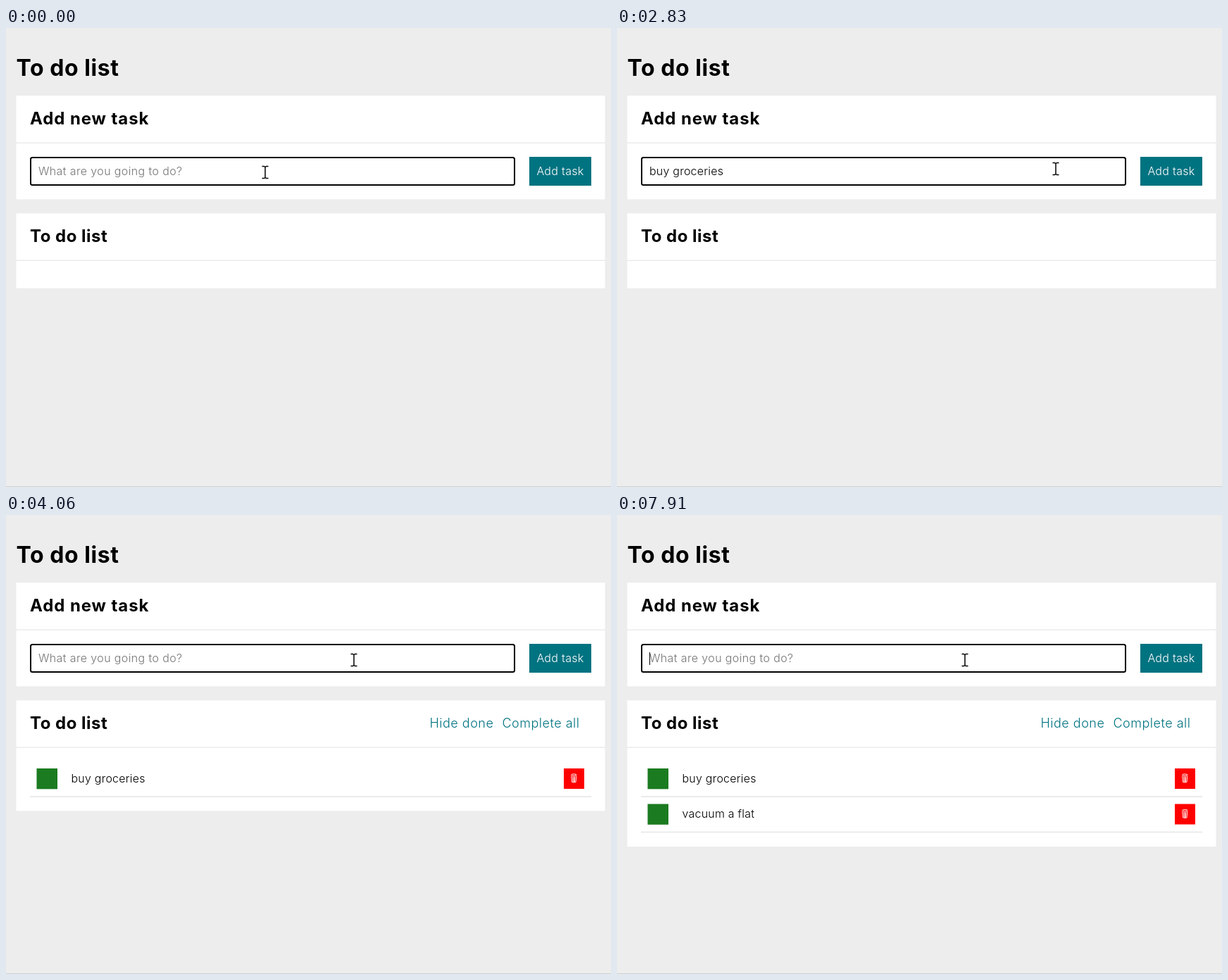
Animation of 859 by 652 pixels, one loop 8000 ms. Source, as an HTML page:

```html
<!DOCTYPE html>
<html lang="en">
<head>
<meta charset="utf-8">
<title>To do list</title>
<style>
  html, body { margin: 0; width: 100%; height: 100%; overflow: hidden; background: #ededed; }
  svg { display: block; }
  text { font: 350 16px Inter, sans-serif; font-optical-sizing: none; white-space: pre; }
  .h1 { font-size: 32px; font-weight: 700; letter-spacing: .55px; }
  .h2 { font-size: 24px; font-weight: 700; letter-spacing: .5px; }
  .wide { letter-spacing: .9px; }
  .link { font-size: 18px; letter-spacing: .5px; fill: #007381; }
  .hint { letter-spacing: .37px; fill: #757575; }
  .task { letter-spacing: .22px; }
  .card { fill: #fff; }
</style>
</head>
<body>
<svg width="859" height="652" viewBox="0 0 859 652">
  <defs>
    <g id="row">
      <rect x="43.5" y="360" width="29.5" height="29.3" fill="#1b7b20"/>
      <rect x="792" y="360" width="29" height="29" fill="#f00"/>
      <g fill="none" stroke="#fff">
        <ellipse cx="806.3" cy="369.2" rx="3.8" ry="1.2"/>
        <path d="M802.7 370.5l.8 8.8q2.8 1.4 5.6 0l.8-8.8M804.8 371.5l.3 7.8M806.3 371.5v8M807.8 371.5l-.3 7.8" stroke-width=".9"/>
      </g>
      <rect x="34" y="399" width="797" height="2" fill="#ebebeb"/>
    </g>
    <path id="bar" d="M-4.5 -8.5H-1.5L0 -7.5L1.5 -8.5H4.5M0 -7.5V7.5M-4.5 8.5H-1.5L0 7.5L1.5 8.5H4.5"/>
  </defs>

  <rect width="859" height="652" fill="#ededed"/>
  <rect y="651" width="859" height="1" fill="#cfcfcf"/>
  <text class="h1" x="14.5" y="68.3">To do list</text>

  <rect class="card" x="14.5" y="96" width="836" height="66.3"/>
  <rect class="card" x="14.5" y="164" width="836" height="79.3"/>
  <text class="h2 wide" x="34" y="136.5">Add new task</text>

  <rect id="field" fill="#fff"/>
  <text id="hint" class="hint" x="46" y="209">What are you going to do?</text>
  <text id="typed" class="task" x="46" y="209"></text>
  <rect id="caret" y="195" width="1" height="18"/>

  <g id="button">
    <rect x="743" y="183" width="88" height="41"/>
    <text x="787" y="209" text-anchor="middle" letter-spacing=".3" fill="#fff" stroke="none">Add task</text>
  </g>

  <rect class="card" x="14.5" y="263.3" width="836" height="66"/>
  <rect id="list" class="card" x="14.5" y="331" width="836"/>
  <text class="h2" x="34" y="304">To do list</text>

  <g id="first">
    <text class="link" x="601.5" y="302">Hide done</text>
    <text class="link" x="704.5" y="302">Complete all</text>
    <use href="#row"/>
    <text class="task" x="92.5" y="379.5">buy groceries</text>
  </g>
  <g id="second">
    <use href="#row" y="50.5"/>
    <text class="task" x="92.5" y="430">vacuum a flat</text>
  </g>

  <g id="pointer">
    <g id="beam" fill="none">
      <use href="#bar" stroke="#fff" stroke-width="3"/>
      <use href="#bar" stroke="#000" stroke-width="1.5"/>
    </g>
    <path id="hand" d="M-1.6 13.5V1.5Q-1.6 0 0 0T1.6 1.5V7Q3.8 5.6 4.4 7.6Q6.4 6.6 7 8.6Q9 8 9 10.2V15Q9 17.6 7.4 19.2V21.5H-1.4V19.5Q-4.6 16.4 -6.6 12.6Q-7 10.4 -4.8 10.8Q-3.2 11.4 -1.6 13.5ZM1.6 7V11M4.4 7.8V11.4M7 8.8V11.8" fill="#fff" stroke="#333" stroke-width=".8"/>
    <path id="arrow" d="M0 0V16.5L3.8 13L6.5 18.8L9 17.7L6.4 12H11.5Z" fill="#fff" stroke="#000" stroke-width="1"/>
  </g>
</svg>
<script>
const LOOP = 8000, ADD_1 = 3500, ADD_2 = 7910, BLUR = 3380;

const typing = [
  { text: 'buy groceries', end: ADD_1,
    at: [70, 150, 290, 690, 1040, 1180, 1290, 1400, 1520, 1630, 1830, 1960, 2160] },
  { text: 'vacuum a flat', end: ADD_2,
    at: [5390, 5520, 5650, 5850, 5990, 6320, 6450, 6850, 6965, 7080, 7195, 7310, 7510] },
];
const caretOn = [[70, 2660], [ADD_1, 4030], [4530, 5060], [5390, LOOP]];

// time, x, y of the pointer's hot spot
const path = [
  [2560, 368, 205], [2830, 623, 200], [2960, 738, 262], [3040, 762, 285],
  [3200, 775, 235], [3320, 778, 216], [3540, 778, 216], [3640, 735, 214],
  [3800, 590, 210], [4060, 494, 206],
];

const $ = id => document.getElementById(id);
const show = (id, on) => $(id).style.display = on ? '' : 'none';
const set = (id, attrs) => {
  for (const key in attrs) $(id).setAttribute(key, attrs[key]);
};
const inside = (x, y, left, top, right, bottom) =>
  x >= left && x <= right && y >= top && y <= bottom;

function pointerAt(t) {
  const next = path.findIndex(p => p[0] > t);
  if (next === 0) return path[0].slice(1);
  if (next < 0) return path[path.length - 1].slice(1);
  const [t0, x0, y0] = path[next - 1], [t1, x1, y1] = path[next];
  const k = (t - t0) / (t1 - t0);
  return [x0 + (x1 - x0) * k, y0 + (y1 - y0) * k];
}

function textAt(t) {
  const entry = typing.find(e => t >= e.at[0] && t < e.end);
  return entry ? entry.text.slice(0, entry.at.filter(a => a <= t).length) : '';
}

function drawField(t) {
  const text = textAt(t), focused = t < BLUR || t >= ADD_1;
  if ($('typed').textContent !== text) $('typed').textContent = text;
  show('hint', !text);
  show('caret', caretOn.some(([from, to]) => t >= from && t < to));
  const width = text ? $('typed').getComputedTextLength() : 0;
  set('caret', { x: Math.round(45.5 + width) });
  set('field', focused
    ? { x: 35, y: 184, width: 687, height: 39, rx: 2.5, stroke: '#000', 'stroke-width': 2 }
    : { x: 34.5, y: 183.5, width: 688.5, height: 40, rx: 1.5, stroke: '#767676', 'stroke-width': 1 });
}

function drawPointer(t) {
  const [x, y] = pointerAt(t);
  const onButton = inside(x, y, 743, 183, 831, 224);
  const onField = inside(x, y, 34, 183, 723, 224);
  set('pointer', { transform: `translate(${Math.round(x)} ${Math.round(y)})` });
  show('beam', onField);
  show('hand', onButton);
  show('arrow', !onField && !onButton);
  set('button', {
    fill: onButton ? '#0093a7' : '#007381',
    stroke: onButton ? '#7fb8c2' : 'none',
    transform: onButton ? 'translate(787 203.6) scale(1.05) translate(-787 -203.6)' : '',
  });
}

function draw(t) {
  drawField(t);
  drawPointer(t);
  show('first', t >= ADD_1);
  show('second', t >= ADD_2);
  set('list', { height: t >= ADD_2 ? 140 : t >= ADD_1 ? 89.3 : 38.6 });
}

let start;
function tick(now) {
  start ??= now;
  draw((now - start) % LOOP);
  requestAnimationFrame(tick);
}
draw(0);
requestAnimationFrame(tick);
</script>
</body>
</html>
```
